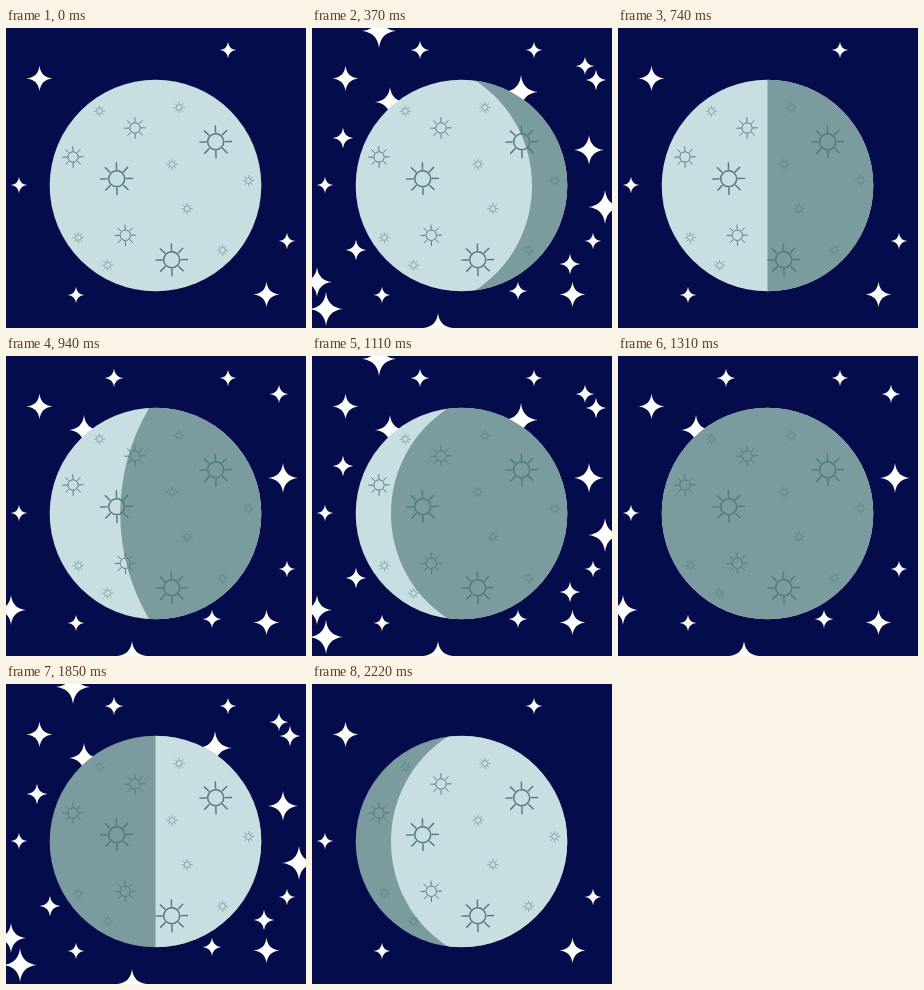
These frames come from a looping animation (300 px wide and 300 px high, 2420 ms). An HTML page with a canvas:

```html
<!DOCTYPE html>
<html lang="en">
<head>
<meta charset="utf-8">
<title>Moon phases</title>
<style>
  html, body { margin: 0; width: 100%; height: 100%; overflow: hidden; background: #040c4c; }
  canvas { display: block; width: 300px; height: 300px; }
</style>
</head>
<body>
<canvas id="stage" width="300" height="300"></canvas>
<script>
const ctx = document.getElementById('stage').getContext('2d');
const SKY = '#040c4c', LIGHT = '#c9dee0', DARK = '#7b9b9e', CRATER = '#507a7b';
const LOOP = 2420, PAIR = 370, LONG_STEP = 200;
const MOON = { x: 149.5, y: 157.5, r: 105.8 };

// Each layer joins the ones before it; star size grows with the layer
const starLayers = [
  { small: [[222, 22], [13, 157], [281, 213], [70, 267]], large: [[33.5, 50.5], [260.5, 266.5]] },
  { small: [[108, 22], [273, 38], [206, 263]], large: [[78, 74], [277, 122], [5, 254], [126, 300]] },
  { small: [[284, 52], [31, 110], [44, 222], [258, 236]], large: [[67, 3], [209, 64], [293, 179], [14, 281]] }
];

// Tiny craters follow the rim, apart from three further in
const bigCraters = [[110.7, 150.7], [209.7, 113.8], [165.7, 231.8]];
const mediumCraters = [[129, 100], [67, 129], [119.3, 207.3]];
const rimAngles = [-127, -3, 44, 121, 146];
const tinyCraters = [[173, 79.5], [166, 136.3], [181, 180.8], ...rimAngles.map(rimPoint)];

function rimPoint(degrees) {
  const a = degrees * Math.PI / 180, distance = MOON.r * 0.88;
  return [MOON.x + distance * Math.cos(a), MOON.y + distance * Math.sin(a)];
}

function drawStar(x, y, r) {
  ctx.beginPath();
  for (let i = 0; i < 4; i++) {
    ctx.rotate(0);
    const a = i * Math.PI / 2, b = a + Math.PI / 2, mid = a + Math.PI / 4, c = r * 0.13;
    if (i === 0) ctx.moveTo(x + r, y);
    ctx.quadraticCurveTo(x + c * Math.cos(mid), y + c * Math.sin(mid), x + r * Math.cos(b), y + r * Math.sin(b));
  }
  ctx.fill();
}

function drawStars(lastLayer) {
  ctx.fillStyle = '#fff';
  for (let layer = 0; layer <= lastLayer; layer++) {
    const { small, large } = starLayers[layer];
    for (const [x, y] of small) drawStar(x, y, 8.3 + layer);
    for (const [x, y] of large) drawStar(x, y, 13 + 2 * layer);
  }
}

function drawCraters(points, scale) {
  ctx.strokeStyle = CRATER;
  ctx.lineWidth = 1.45;
  for (const [x, y] of points) {
    ctx.save();
    ctx.translate(x, y);
    ctx.scale(scale, scale);
    ctx.rotate(-0.02);
    ctx.beginPath();
    ctx.arc(0, 0, 8, 0, Math.PI * 2);
    for (let i = 0; i < 8; i++) {
      ctx.moveTo(9, 0);
      ctx.lineTo(16.4, 0);
      ctx.rotate(Math.PI / 4);
    }
    ctx.stroke();
    ctx.restore();
  }
}

// Shades the disc right of the terminator; edge runs from 1 (right limb) to -1 (left limb)
function shadeRight(color, edge) {
  const { x, y, r } = MOON;
  const shift = 0.8 * r * edge * Math.abs(edge) * (1 - Math.abs(edge));
  const bulge = edge * r - shift;
  // Control points of the circular arc with this bulge over the chord 2r
  const handleX = x + shift + bulge * 4 / 3;
  const handleY = r - (r * r - bulge * bulge) / r * 2 / 3;
  ctx.fillStyle = color;
  ctx.beginPath();
  ctx.moveTo(x + shift, y - r);
  ctx.bezierCurveTo(handleX, y - handleY, handleX, y + handleY, x + shift, y + r);
  ctx.lineTo(x + 2 * r, y + r);
  ctx.lineTo(x + 2 * r, y - r);
  ctx.fill();
}

function drawMoon(step) {
  const waning = step <= 7;
  const progress = Math.max(0, step - (waning ? 1 : 7)) / 6;
  ctx.save();
  ctx.beginPath();
  ctx.arc(MOON.x, MOON.y, MOON.r, 0, Math.PI * 2);
  ctx.clip();
  ctx.fillStyle = waning ? LIGHT : DARK;
  ctx.fillRect(0, 0, 300, 300);
  shadeRight(waning ? DARK : LIGHT, 1 - 2 * progress);
  ctx.restore();
}

// Steps alternate between 200 ms and 170 ms
function stepAt(time) {
  const t = time % LOOP;
  return 2 * Math.floor(t / PAIR) + (t % PAIR >= LONG_STEP ? 1 : 0);
}

function draw(step) {
  ctx.fillStyle = SKY;
  ctx.fillRect(0, 0, 300, 300);
  drawStars(2 - Math.abs(step % 4 - 2));
  drawMoon(step);
  drawCraters(bigCraters, 1);
  drawCraters(mediumCraters, 0.65);
  drawCraters(tinyCraters, 0.35);
}

const start = performance.now();
function tick() {
  draw(stepAt(performance.now() - start));
  requestAnimationFrame(tick);
}
tick();
</script>
</body>
</html>
```
